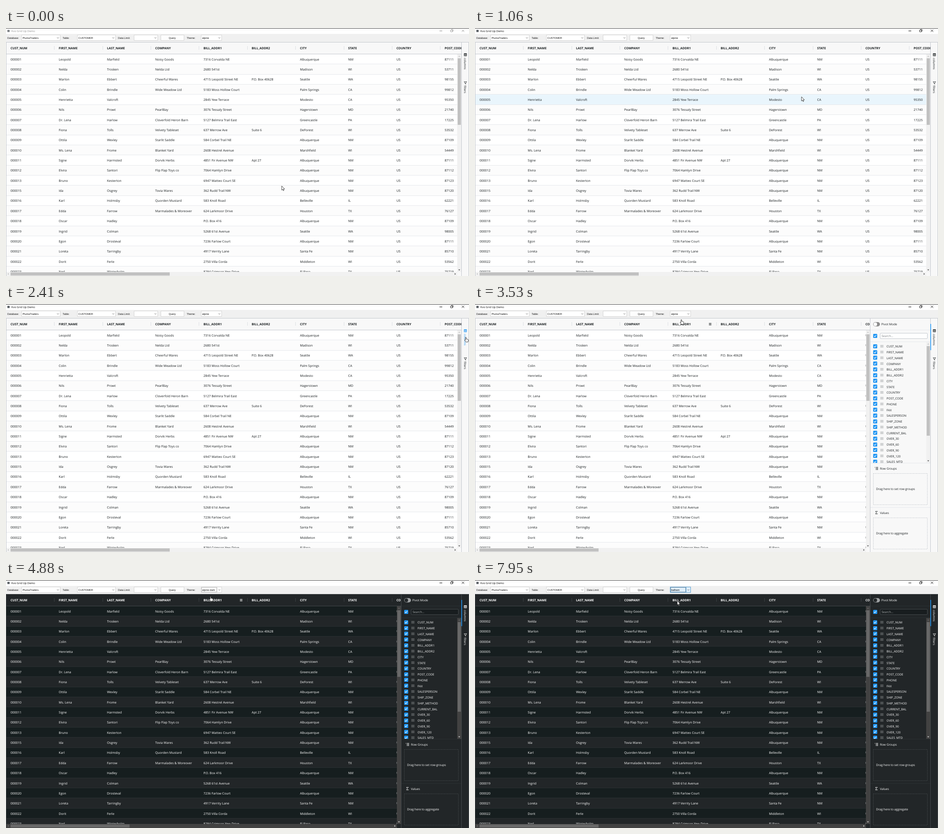
Write an HTML page with a canvas that moves like this. It is 1021x548 px and loops after 8 s.

```html
<!DOCTYPE html>
<html lang="en">
<head>
<meta charset="utf-8">
<title>Data grid themes</title>
<style>
html, body { margin: 0; width: 100%; height: 100%; overflow: hidden; background: #fff; }
canvas { display: block; width: 1021px; height: 548px; }
</style>
</head>
<body>
<canvas id="stage"></canvas>
<script>
const W = 1021, H = 548, LOOP = 8000;
const COL = 106.36, ROW = 22.34, TOP = 58, BOTTOM = 539;
const UI = '"Open Sans", "Noto Sans", sans-serif';
const NATIVE = '"Liberation Sans", Arial, sans-serif';

const canvas = document.getElementById('stage');
const dpr = window.devicePixelRatio || 1;
canvas.width = W * dpr;
canvas.height = H * dpr;
const c = canvas.getContext('2d');
c.scale(dpr, dpr);
c.textRendering = 'geometricPrecision';

const LIGHT = {
  bg: '#ffffff', odd: '#fcfcfc', head: '#f8f8f8', line: '#e6e8ec', split: '#dcdfe3', border: '#c4c8ce',
  text: '#181d1f', dim: '#7d8285', track: '#f1f1f1', thumb: '#c1c1c1', arrow: '#505050',
  input: '#ffffff', knob: '#ffffff', toggle: '#8c8c8c', hover: '#e9f5fc', weight: 400
};
const DARK = {
  bg: '#161e1f', odd: '#222628', head: '#222628', line: '#2a3032', split: '#3b4043', border: '#43484b',
  text: '#ffffff', dim: '#a9adae', track: '#424242', thumb: '#686868', arrow: '#d5d5d5',
  input: '#181d1f', knob: '#222628', toggle: '#a0a3a5', hover: '#1c3242', weight: 500
};

const columns = ('CUST_NUM FIRST_NAME LAST_NAME COMPANY BILL_ADDR1 BILL_ADDR2 CITY STATE COUNTRY POST_CODE ' +
  'PHONE FAX SALESPERSON SHIP_ZONE SHIP_METHOD CURRENT_BAL OVER_30 OVER_60 OVER_90 OVER_120 SALES_MTD').split(' ');

const rows = `Leopold|Marfield|Noisy Goods|7316 Corvalda NE||Albuquerque|NM|87111
Nelda|Trosken|Nelda Ltd|2680 541st||Madison|WI|53711
Marlon|Ebbert|Cheerful Wares|4715 Leopold Street NE|P.O. Box 40628|Seattle|WA|98155
Colin|Brindle|Wide Meadow Ltd|5183 Moss Hollow Court||Palm Springs|CA|99812
Henrietta|Valcroft||2845 Yew Terrace||Modesto|CA|95350
Nils|Prowt|PearlBay|3076 Tessaly Street||Hagerstown|MD|21740
Dr. Lena|Harlow|Cloverfold Heron Barn|5127 Belmira Trail East||Greencastle|PA|17225
Fiona|Tolls|Velvety Tableset|637 Merrow Ave|Suite 6|DeForest|WI|53532
Ottila|Wexley|Starlit Saddle|584 Corbel Trail NE||Albuquerque|NM|87109
Ms. Lena|Frome|Blanket Yard|2608 Hestrel Avenue||Marshfield|WI|54449
Signe|Harmsted|Dorvik Herbs|4851 Fir Avenue NW|Apt 27|Albuquerque|NM|87111
Elvira|Santori|Flip Flap Toys co|7064 Hamlyn Drive||Albuquerque|NM|87112
Bruno|Kesterton||6947 Matteo Court SE||Albuquerque|NM|87123
Ida|Osgrey|Tovia Wares|362 Rudd Trail NW||Albuquerque|NM|87120
Karl|Holmsby|Quorden Mustard|583 Knoll Road||Belleville|IL|62221
Edda|Farrow|Marmalades & Moreover|624 Larkmoor Drive||Houston|TX|76127
Oscar|Hadley||P.O. Box 416||Albuquerque|NM|87109
Ingrid|Colman||5268 61st Avenue||Seattle|WA|98005
Egon|Drosteval||7236 Farlow Court||Albuquerque|NM|87111
Loreta|Tarringby||4917 Verrity Lane||Santa Fe|NM|85710
Dorit|Ferle||2750 Villa Corda||Middleton|WI|53562
Ned|Winterholm||8294 Crimson Yew Drive||El Paso|TX|75719`.split('\n').map((line, i) => {
  const f = line.split('|');
  const id = String(i + (i < 13 ? 1 : 2)).padStart(6, '0');
  return [id, ...f.slice(0, 7), 'US', f[7]];
});

const themes = ['alpine', 'alpine-dark', 'balham', 'balham-dark', 'material'];

// Pointer stops: "time x y"
const stops = `0 608 349,140 650 316,340 700 291,600 770 268,670 838 239,740 841 231,840 838 226,910 830 221,
1060 720 152,1150 560 86,1300 490 44,1390 460 27.6,1460 457 21,1620 462 22,1710 475 24,1800 487 26,
2110 600 40,2180 730 50,2260 870 54,2330 985 56,2410 1014 73,2650 930 56,2730 841 39,2900 780 38,2970 717 38,
3130 640 44,3210 570 54,3290 520 61,3360 490 60,3440 465 48,3520 455 34,3600 451 25,3670 450 23,
4080 450 30,4170 449 41,4310 450 43,4380 450 38,4560 450 36,4810 451 36,
5780 450 33,5860 450 27,5940 449 24,6010 450 22,6090 450 21,6900 449 32,6970 448 41,7150 448 43,7210 447 45,7380 446 46`
  .split(',').map(s => s.trim().split(' ').map(Number));

const within = (t, a, b) => t >= a && t < b;

function fill(x, y, w, h, color) {
  c.fillStyle = color;
  c.fillRect(x, y, w, h);
}
function frame(x, y, w, h, color, dash = []) {
  c.strokeStyle = color;
  c.lineWidth = 1;
  c.setLineDash(dash);
  c.strokeRect(x + .5, y + .5, w - 1, h - 1);
  c.setLineDash([]);
}
function path(points, color, width = 1, close = false) {
  c.beginPath();
  points.forEach(([x, y]) => c.lineTo(x, y));
  if (close) c.closePath();
  c.strokeStyle = color;
  c.lineWidth = width;
  c.stroke();
}
function text(s, x, y, size, color, font = UI, weight = 400) {
  c.font = `${weight} ${size}px ${font}`;
  c.fillStyle = color;
  c.fillText(s, x, y + size * .36);
}
function clipped(x, y, w, h, draw) {
  c.save();
  c.beginPath();
  c.rect(x, y, w, h);
  c.clip();
  draw();
  c.restore();
}
function triangle(x, y, dx, dy, color) {
  c.beginPath();
  c.moveTo(x + dx * 1.5, y + dy * 1.5);
  c.lineTo(x - dx - dy * 2, y - dy - dx * 2);
  c.lineTo(x - dx + dy * 2, y - dy + dx * 2);
  c.fillStyle = color;
  c.fill();
}
function vScroll(x, y, h, thumbEnd, p) {
  fill(x, y, 9, h, p.track);
  fill(x + 1, y + 9, 7, thumbEnd - y - 9, p.thumb);
  triangle(x + 4.5, y + 4.5, 0, -1, p.thumb);
  triangle(x + 4.5, y + h - 4.5, 0, 1, p.arrow);
}

function titleBar(active) {
  const ink = active ? '#000' : '#8f8f8f';
  fill(0, 0, W, 13, '#fff');
  fill(0, 0, W, 1, '#3d3d3d');
  fill(3, 4, 5, 5, active ? '#62676c' : '#85898d');
  text('Kvo Grid Up Demo', 12, 6.7, 6, ink);
  path([[956, 6.5], [962, 6.5]], ink);
  path([[980.5, 4.5], [984.5, 4.5], [984.5, 8.5], [980.5, 8.5]], ink, .8, true);
  path([[982, 4.5], [982, 3], [986, 3], [986, 7], [984.5, 7]], ink, .8);
  path([[1005, 3.2], [1010.5, 8.7]], ink, .8);
  path([[1010.5, 3.2], [1005, 8.7]], ink, .8);
}

function combo(x, w, label, state = '') {
  const hot = state.includes('hot'), focus = state.includes('focus');
  const edge = hot ? '#5a9fd0' : '#d6d6d6';
  fill(x, 15, w, 13, hot ? '#dfeefa' : '#fff');
  frame(x, 15, w, 13, edge);
  if (focus) {
    fill(x + w - 11, 16, 1, 11, edge);
    frame(x + 1, 16, w - 12, 11, hot ? '#8399ab' : '#8a8a8a', hot ? [] : [1, 1]);
  }
  text(label, x + 2.6, 21.9, 5.65, '#111', NATIVE);
  const ax = x + w - 5.5;
  path([[ax - 2, 20.8], [ax, 22.9], [ax + 2, 20.8]], '#555', .8);
}

function toolbar(theme, state) {
  fill(0, 13, W, 18, '#f0f0f0');
  [['Database:', 3], ['Table:', 125], ['Data Limit:', 247], ['Theme:', 398.5]]
    .forEach(([s, x]) => text(s, x, 21.5, 5.6, '#111', NATIVE));
  combo(34, 86, 'PlumaTraders');
  combo(157, 85, 'CUSTOMER');
  combo(282, 53, '');
  fill(341, 15, 52, 13, '#fdfdfd');
  frame(341, 15, 52, 13, '#d6d6d6');
  text('Query', 359, 21.6, 5.65, '#111', NATIVE);
  combo(430, 46, theme, state);
}

function grid(p, width, hoverRow, menuCol) {
  const body = width - 9;
  clipped(0, TOP, body, BOTTOM - TOP, () => {
    rows.forEach((cells, i) => {
      const top = Math.round(TOP + i * ROW), next = Math.round(TOP + (i + 1) * ROW);
      fill(0, top, body, next - top, i === hoverRow ? p.hover : i % 2 ? p.odd : p.bg);
      fill(0, next - 1, body, 1, p.line);
      cells.forEach((s, k) => s && text(s, 10 + k * COL, TOP + i * ROW + 11.2, 7, p.text, UI, p.weight));
    });
  });
  clipped(0, 31, width, 27, () => {
    fill(0, 31, width, 27, p.head);
    for (let k = 0; k < 10; k++) {
      text(columns[k], 10 + k * COL, 45, 6.8, p.text, UI, 700);
      fill(Math.round((k + 1) * COL), 40, 1, 8, p.split);
    }
    if (menuCol >= 0) {
      const x = (menuCol + 1) * COL - 16;
      for (let i = 0; i < 3; i++) fill(x, 42 + i * 2, 5.5, .9, p.text);
    }
  });
  fill(0, 31, W, 1, p.border);
  fill(0, 57, width, 1, p.border);
  vScroll(body, TOP, BOTTOM - TOP, 214, p);
  fill(0, BOTTOM, width, 9, p.track);
  fill(10, BOTTOM + 1, width > 900 ? 351 : 262.5, 7, p.thumb);
  triangle(5, 543.5, -1, 0, p.thumb);
  triangle(body - 4.5, 543.5, 1, 0, p.arrow);
  fill(body, BOTTOM, 9, 9, p.head);
  fill(0, 31, 1, H - 31, p.border);
}

function checkbox(x, y) {
  c.beginPath();
  c.roundRect(x, y - 4.5, 9, 9, 1.5);
  c.fillStyle = '#2196f3';
  c.fill();
  path([[x + 2, y], [x + 3.8, y + 1.9], [x + 7, y - 2]], '#fff', 1.1);
}

function dropZone(p, y, title, hint, icon) {
  fill(872, y - 23, 132, 1, p.line);
  icon(y - 11);
  text(title, 893, y - 10.7, 6.55, p.text, UI, p.weight);
  frame(878, y, 120, 70, p.border, [2, 1.5]);
  text(hint, 884.5, y + 35, 6.6, p.text, UI, p.weight);
}

function panel(p) {
  fill(871, 31, 133, H - 31, p.head);
  fill(871, 31, 1, H - 31, p.border);
  fill(871, 31, 133, 1, p.border);

  c.beginPath();
  c.roundRect(878, 40, 15, 9.5, 4.75);
  c.fillStyle = p.toggle;
  c.fill();
  c.beginPath();
  c.arc(882.8, 44.75, 3.9, 0, 7);
  c.fillStyle = p.knob;
  c.fill();
  text('Pivot Mode', 896, 45, 6.6, p.text, UI, p.weight);
  fill(872, 57, 132, 1, p.line);

  checkbox(878, 70.5);
  c.beginPath();
  c.roundRect(893.5, 64.5, 104, 12, 1.5);
  c.fillStyle = p.input;
  c.fill();
  c.strokeStyle = p.border;
  c.lineWidth = 1;
  c.stroke();
  text('Search...', 896.5, 70.8, 6.6, p.dim);
  fill(872, 83, 132, 1, p.line);

  clipped(872, 84, 123, 267, () => columns.forEach((s, i) => {
    const y = 93.4 + i * 12.75;
    checkbox(878, Math.floor(y) + .5);
    for (let k = 0; k < 9; k++)
      fill(894.3 + k % 3 * 2.3, y - 2.6 + (k / 3 | 0) * 2, 1.3, 1.1, p.dim);
    text(s, 907.6, y + .6, 6.55, p.text, UI, p.weight);
  }));
  vScroll(995, 84, 267, 291, p);

  dropZone(p, 374, 'Row Groups', 'Drag here to set row groups', y => {
    for (let i = 0; i < 3; i++) {
      fill(881.5 + (i ? 2 : 0), y - 2.5 + i * 2.4, 1.2, 1, p.text);
      fill(884 + (i ? 1 : 0), y - 2.5 + i * 2.4, i ? 4 : 5, 1, p.text);
    }
  });
  dropZone(p, 472, 'Values', 'Drag here to aggregate', y =>
    path([[887.5, y - 2], [887.5, y - 2.8], [883, y - 2.8], [885.6, y], [883, y + 2.8], [887.5, y + 2.8], [887.5, y + 2]], p.text, .9));
}

function sideBar(p, open, hot) {
  const ink = hot ? '#2196f3' : p.text;
  const label = (s, y, color) => {
    c.save();
    c.translate(1012.6, y);
    c.rotate(Math.PI / 2);
    text(s, 0, 0, 6.45, color, UI, p.weight);
    c.restore();
  };
  fill(1004, 31, 17, H - 31, p.head);
  fill(1004, 31, 1, H - 31, p.border);
  fill(1020, 31, 1, H - 31, p.border);
  fill(1004, 31, 17, 1, p.border);
  if (open) fill(1004, 44, 1.6, 58, '#2196f3');
  path([[1010.3, 56.5], [1015.7, 56.5], [1015.7, 61.8], [1010.3, 61.8]], ink, .9, true);
  fill(1010, 56, 6, 1.6, ink);
  path([[1013, 57], [1013, 62]], ink, .8);
  path([[1010, 59.6], [1016, 59.6]], ink, .7);
  label('columns', 66, ink);
  path([[1010.2, 118.8], [1016, 118.8], [1013.8, 121.5], [1013.8, 124], [1012.3, 123], [1012.3, 121.5]], p.text, .8, true);
  label('filters', 127, p.text);
}

function popup(selected, y) {
  const step = 7.1, active = y < 28 ? selected : Math.floor((y - 28) / step);
  fill(430, 28, 47, 36.5, '#fff');
  themes.forEach((s, i) => {
    const top = 28.5 + i * step;
    if (i === active) fill(431, top, 45, step, '#0078d7');
    text(s, 432.6, top + 3.6, 5.6, i === active ? '#fff' : '#111', NATIVE);
  });
  frame(430, 28, 47, 36.5, '#767676');
}

function pointer(x, y, hand) {
  const shape = new Path2D(hand
    ? 'M2 1Q2.8-.5 3.7 1V4.2L7.4 5.2Q8.6 5.6 8.4 7L7.5 11H3L.2 7.2Q-.1 5.8 1.2 6.2L2 7Z'
    : 'M0 0V9.3L2.1 7.4L3.5 10.5L5 9.9L3.6 6.8H6.5Z');
  c.save();
  c.translate(x - (hand ? 2.8 : 0), y);
  c.fillStyle = '#fff';
  c.fill(shape);
  c.strokeStyle = '#1a1a1a';
  c.lineWidth = .8;
  c.lineJoin = 'round';
  c.stroke(shape);
  c.restore();
}

function comboState(t) {
  if (within(t, 1460, 1800) || within(t, 3600, 3670)) return 'hot';
  if (t < 3670) return '';
  const hot = t < 4880 || within(t, 5860, 6420) || t >= 7950;
  return hot ? 'hot focus' : 'focus';
}

function draw(t) {
  const [, x, y] = stops.findLast(s => s[0] <= t);
  const p = t < 4880 ? LIGHT : DARK;
  const open = t >= 2580;
  const listOpen = within(t, 3670, 4810) || within(t, 6250, 7610);
  const picked = t < 4810 ? 0 : t < 7610 ? 1 : 2;
  const width = open ? 871 : 1004;
  const free = !listOpen && t < 7610;
  const overHead = free && y > 27.5 && y < TOP && x < width;
  const overRow = free && t >= 340 && y >= TOP && x < width - 9;

  grid(p, width, overRow ? Math.floor((y - TOP) / ROW) : -1,
    overHead && !within(t, 4810, 4880) ? Math.floor(x / COL) : -1);
  if (open) panel(p);
  sideBar(p, open, within(t, 2410, 2650));
  titleBar(t >= 140);
  toolbar(themes[picked], comboState(t));
  if (listOpen) popup(picked, y);
  pointer(x, y, overHead && y > 31 || x > 1004);
}

const start = performance.now();
function tick() {
  draw((performance.now() - start) % LOOP);
  requestAnimationFrame(tick);
}
tick();
</script>
</body>
</html>
```
